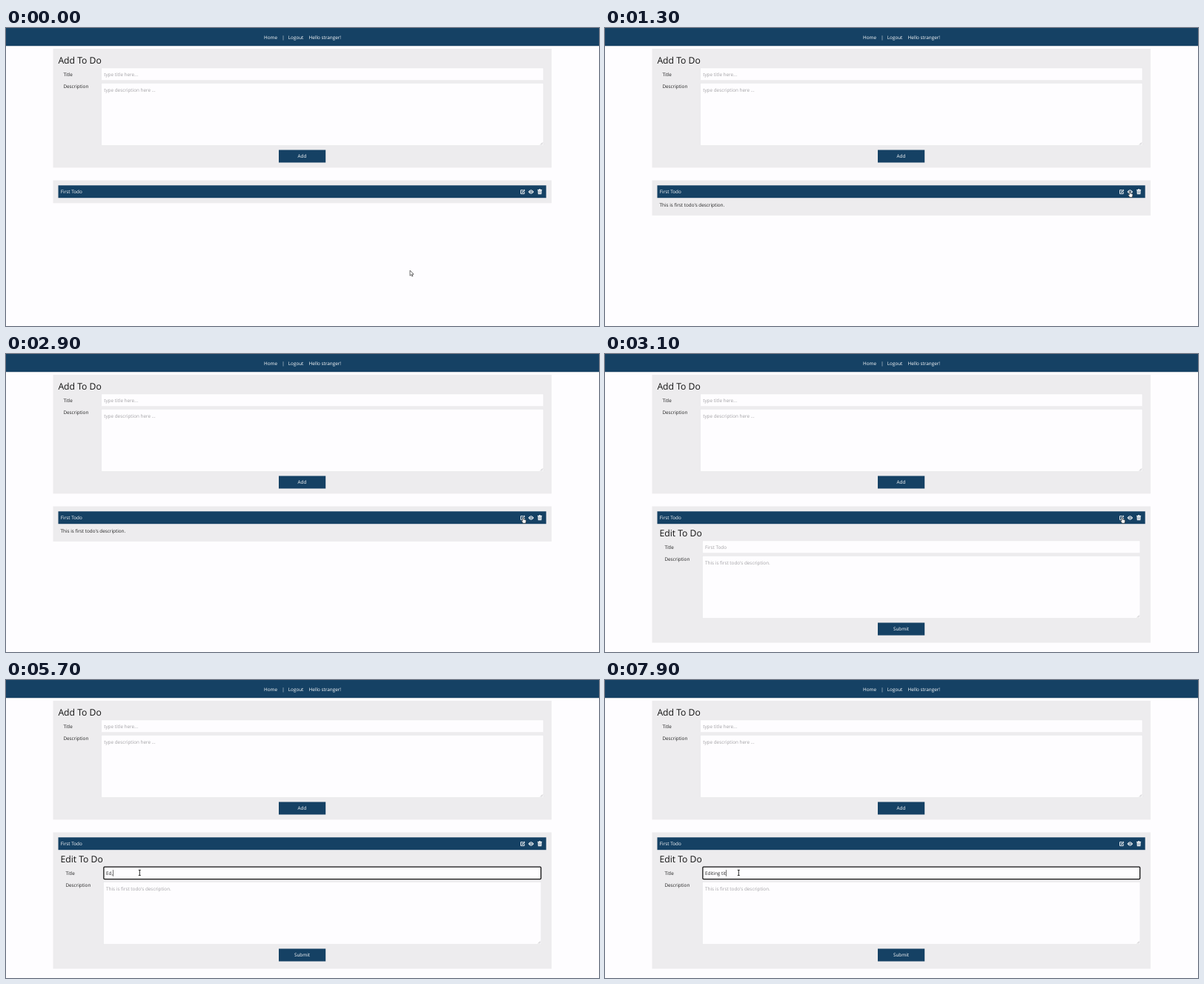
These frames come from a looping animation (800 px wide and 402 px high, 8000 ms). An HTML page:

```html
<!DOCTYPE html>
<html lang="en">
<head>
<meta charset="utf-8">
<title>To do list</title>
<style>
  html, body { margin: 0; width: 100%; height: 100%; overflow: hidden; background: #fefdff; }
  svg { display: block; width: 800px; height: 402px; }
  text { font: 6.35px "Open Sans", "Noto Sans", sans-serif; fill: #222; white-space: pre; text-rendering: geometricPrecision; }
  .h { font-size: 12.2px; fill: #111; }
  .w { fill: #fff; }
  .p { fill: #a2a1a4; }
  .mid { text-anchor: middle; }
  .navy { fill: #154164; }
  .panel { fill: #edecee; }
  .field { fill: #fefdff; stroke: #e4e3e6; stroke-width: .4; }
  .line { fill: none; stroke: #fff; stroke-width: .9; }
  .grip { fill: none; stroke: #88878a; stroke-width: .5; }
</style>
</head>
<body>
<svg id="stage" viewBox="0 0 800 402"></svg>
<script>
const rect = (cls, x, y, w, h, more = '') =>
  `<rect class="${cls}" x="${x}" y="${y}" width="${w}" height="${h}" ${more}/>`;
const text = (cls, x, y, s, more = '') => `<text class="${cls}" x="${x}" y="${y}" ${more}>${s}</text>`;

// y is the top of the title field
const form = (x, y, fieldX, fieldW, heading, title, description, button, id) =>
  text('h', x, y - 6.4, heading) +
  text('', x + 7, y + 10.6, 'Title') +
  text('', x + 7, y + 27.4, 'Description') +
  rect('field', fieldX, y, fieldW, 16.6) +
  rect('field', fieldX, y + 20.5, fieldW, 83.8) +
  `<path class="grip" d="M${fieldX + fieldW - 4} ${y + 103.5}l3-3m-1.2 3l1.2-1.2"/>` +
  text('p', fieldX + 3.4, y + 10.9, title, `id="${id}"`) +
  text('p', fieldX + 3.4, y + 31.6, description) +
  rect('navy', 368, y + 110.5, 63.2, 17) +
  text('w mid', 399.5, y + 121.4, button);

const icons = `
  <path class="line" d="M697.6 218.7H694.5V223.6H699.2V221M696.3 222L696.6 220.7L699.2 218.2L700 219L697.4 221.6Z"/>
  <path class="w" d="M704.6 221Q708.3 215.5 712 221Q708.3 226.5 704.6 221Z"/>
  <circle class="navy" cx="708.3" cy="221" r="1.8"/><circle class="w" cx="708.3" cy="221" r=".9"/>
  <path class="w" d="M717.1 218H718.9L719.3 217.3H720.9L721.3 218H723.1V218.9H717.1ZM717.5 219.3H722.7L722.4 224.3H717.8Z"/>
  <path d="M719 220.3V223.3M720.1 220.3V223.3M721.2 220.3V223.3" stroke="#154164" stroke-width=".4"/>`;

const pointers = `
  <path id="arrow" d="M0 0V7.2L1.7 5.7L2.8 8.1L3.9 7.6L2.8 5.2H5Z" fill="#fff" stroke="#333" stroke-width=".7"/>
  <path id="hand" d="M-.7 .2Q0-.8 .7 .2V2.7L3.3 3.3Q4.2 3.6 3.9 5L3.3 7.8H-.2L-2.2 4.8Q-1.9 3.8-.7 4.7Z" fill="#fff" stroke="#222" stroke-width=".6"/>
  <path id="beam" d="M-1.5-3.6H1.5M0-3.6V3.6M-1.5 3.6H1.5" fill="none" stroke="#111" stroke-width=".9"/>`;

const stage = document.getElementById('stage');
stage.innerHTML =
  rect('navy', 0, 0, 800, 24.2) +
  rect('', 0, 24.2, 800, .8, 'fill="#c9cfd6"') +
  text('w', 348, 14.5, 'Home') + text('w', 372.3, 14.5, '|') +
  text('w', 380.8, 14.5, 'Logout') + text('w', 408.6, 14.5, 'Hello stranger!') +
  rect('panel', 63.5, 28, 672.5, 160.4) +
  form(70.4, 54, 128.8, 596.2, 'Add To Do', 'type title here...', 'type description here ...', 'Add', 'newTitle') +
  rect('panel', 63.5, 205.5, 672.5, 30.8, 'id="list"') +
  rect('navy', 70.5, 212.3, 658.2, 16.9) +
  text('w', 73.8, 223.4, 'First Todo') + icons +
  `<g id="details">${text('', 73.5, 240.8, 'This is first todo\'s description.')}</g>` +
  `<g id="edit">${form(73.4, 252, 131.7, 590.2, 'Edit To Do', 'First Todo', 'This is first todo\'s description.', 'Submit', 'title')}</g>` +
  rect('', 131.9, 252.2, 589.8, 16.4, 'id="focus" rx="1" fill="none" stroke="#111" stroke-width="1.3"') +
  rect('', 0, 256.2, .6, 8.6, 'id="caret" fill="#111"') +
  `<g id="mouse">${pointers}</g>`;

const $ = id => document.getElementById(id);
const show = (id, on) => $(id).style.display = on ? '' : 'none';

// [time, x, y]
const path = [
  [0, 545, 327], [900, 710, 222], [1100, 708, 220.5], [1300, 708, 220.5], [1700, 692, 267],
  [2100, 708, 220.5], [2900, 697.7, 220.5], [3100, 697.7, 220.5], [3700, 180.3, 260], [8000, 180.3, 260]
];
// [time, value of the title field]
const typing = [
  [0, ''], [5400, 'E'], [5600, 'Ed'], [5700, 'Ed,'], [6000, 'Ed'], [6500, 'Edi'], [6700, 'Edit'], [6800, 'Editi'],
  [6900, 'Editin'], [7100, 'Editing'], [7300, 'Editing '], [7800, 'Editing ti'], [7900, 'Editing tit']
];

function mouseAt(t) {
  const i = path.findIndex(k => k[0] > t);
  const [t0, x0, y0] = path[i - 1], [t1, x1, y1] = path[i];
  const u = (t - t0) / (t1 - t0), e = u * u * (3 - 2 * u);
  return [x0 + (x1 - x0) * e, y0 + (y1 - y0) * e];
}

function draw(now) {
  const t = Math.floor(now % 8000 / 100) * 100;
  const editing = t >= 3100, focused = t >= 3900;

  show('details', t >= 1300 && !editing);
  show('edit', editing);
  $('list').setAttribute('height', editing ? 184 : t >= 1300 ? 47.4 : 30.8);

  const value = typing.filter(k => k[0] <= t).pop()[1];
  const title = $('title');
  title.textContent = value || 'First Todo';
  title.setAttribute('class', value ? '' : 'p');
  show('focus', focused);
  show('caret', focused && !(t >= 4400 && t < 5000));
  $('caret').setAttribute('x', 135.2 + (value ? title.getComputedTextLength() : 0));

  const [x, y] = mouseAt(t);
  const onField = editing && x > 132 && x < 722 && y > 252 && y < 356;
  const onIcon = x > 693 && x < 724 && y > 216 && y < 225;
  $('mouse').setAttribute('transform', `translate(${x} ${y})`);
  show('beam', onField);
  show('hand', onIcon);
  show('arrow', !onField && !onIcon);
}

const start = performance.now();
function tick() {
  draw(performance.now() - start);
  requestAnimationFrame(tick);
}
tick();
</script>
</body>
</html>
```
